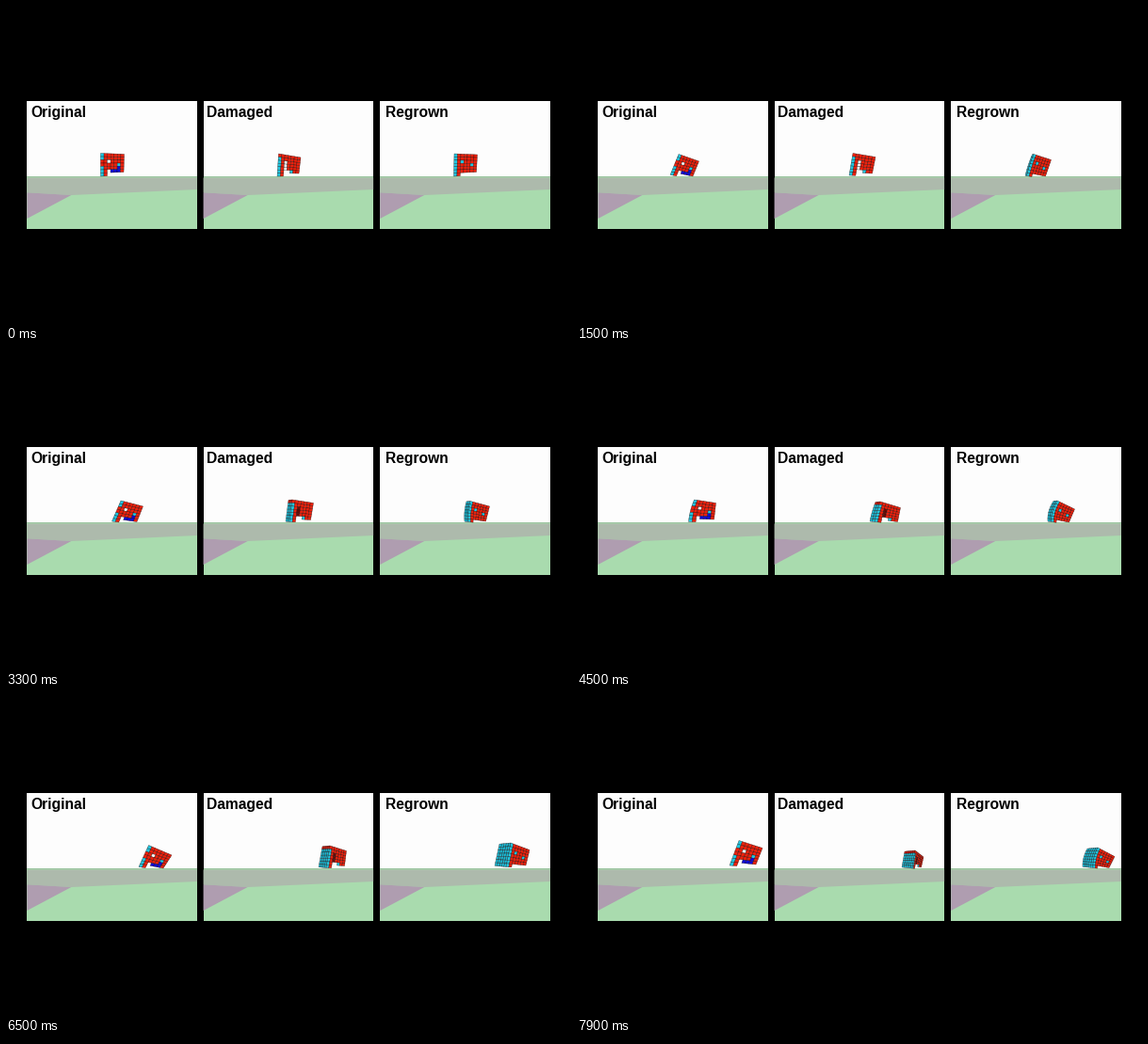
Animation, 600 px wide and 338 px high, one loop 8000 ms. Source, as a matplotlib script:

```python
import numpy as np
import matplotlib.pyplot as plt
from matplotlib.animation import FuncAnimation
from matplotlib.collections import PolyCollection
from matplotlib.patches import Polygon

W, H, DPI = 600, 338, 100
FRAMES, STEP = 80, 100
PX = 72 / DPI
GROUND = 181.2
N = 7

RED, CYAN, BLUE = (0.93, 0.13, 0.05), (0.13, 0.78, 0.88), (0.05, 0.04, 0.85)
SIDE_CYAN, SIDE_RED = (0.10, 0.73, 0.83), (0.78, 0.09, 0.04)
WHITE, INNER = np.array((0.99, 0.99, 0.99)), np.array((0.40, 0.05, 0.03))
PAINT = {"R": RED, "C": CYAN, "B": BLUE}

TIMES = [0, 1500, 3300, 4500, 5700, 6500, 7900]

# Voxel maps: R muscle, C rigid, B soft, H hole, . empty
ORIGINAL = ["CRRRRRR", "CRRRRRR", "RRHRRRR", "RRRRRCR",
            "CRRRRBR", "CR.BBBR", "CR....."]
DAMAGED = ["RRRRRRR", "CRRRRRR", "CRHRRRR", "CRHRRRR",
           "CRHRRRR", "CR..CRR", "CR....."]
REGROWN = ["CRRRRRR", "CRRRRRR", "CRCRRRR", "CRRRRCR",
           "CRRRRRR", "CRRRRRR", "CR....."]

# Each pose: top left, top right, lower right, foot, side depth, bow
ORIGINAL_POSES = [
    (100.5, 156.5, 125.5, 157.5, 125, 176.5, 100.5, 181, 0, 0),
    (108, 157.5, 129.5, 165, 123, 181, 99, 179.5, 0, 0),
    (122, 158, 145.5, 164, 139, 180.5, 112.5, 180, 0, 0),
    (124.5, 157, 147.5, 160.5, 145.5, 178, 118.5, 180.5, 0, 1),
    (138, 156, 162, 160, 156, 178, 131, 180.5, 0, 0),
    (151.5, 156.5, 176, 167, 167, 181, 141, 179.5, 0, 0),
    (172, 151.5, 197, 159.5, 190, 177, 162, 178, 0, 0),
]
DAMAGED_POSES = [
    (289.5, 157, 313, 161, 311, 178, 288, 181, 0, 0),
    (293, 156.5, 317, 160.5, 313.5, 178, 289, 180, 0, 0),
    (304, 157, 326.5, 160.5, 323.5, 178.5, 301, 180.5, 4, 0),
    (322, 159, 343.5, 165.5, 340.5, 180.5, 316, 180.5, 5, 0.5),
    (335, 156.5, 355, 162, 351, 177.5, 334.5, 179, 6.5, 0),
    (344, 157, 361.5, 162.5, 359.5, 178.5, 340, 180.5, 8, 0),
    (359, 162, 368, 169, 365.5, 180, 356, 181, 11, 0),
]
REGROWN_POSES = [
    (476, 157, 500.5, 158, 499.5, 176.5, 475.5, 181, 0, 0),
    (485, 157.5, 503.5, 163.5, 497.5, 181, 477.5, 180.5, 1.5, 0.5),
    (493, 158.5, 513.5, 164, 509.5, 180, 491, 180.5, 4, 1),
    (510, 158, 528.5, 167, 522.5, 181, 504, 180.5, 4, 2),
    (525, 159, 543.5, 169, 536.5, 181, 518.5, 180.5, 6, 2),
    (536, 154, 556, 161.5, 552, 178, 531, 179.5, 12, 0),
    (553, 159, 571, 168.5, 565, 180.5, 548, 180.5, 11, 1.5),
]


def pose_at(poses, t, swing):
    """Blend the key poses and rock the body about its feet in between."""
    poses = np.array(poses, float)
    p = np.array([np.interp(t, TIMES, col) for col in poses.T])
    quad, depth, bow = p[:8].reshape(4, 2), p[8], p[9]

    i = min(np.searchsorted(TIMES, t, side="right") - 1, len(TIMES) - 2)
    span = TIMES[i + 1] - TIMES[i]
    cycles = max(1, round(span / 450))
    phase = np.sin(np.pi * cycles * (t - TIMES[i]) / span)
    a = np.radians(swing) * phase
    pivot = (quad[2] + quad[3]) / 2
    turn = np.array([[np.cos(a), np.sin(a)], [-np.sin(a), np.cos(a)]])
    quad = (quad - pivot) @ turn + pivot
    quad[:, 1] -= max(0, quad[2:, 1].max() - GROUND)
    return quad, depth, bow


def robot(cells, quad, depth, bow):
    """Return voxel polygons and their colours, side face first."""
    tl, tr, low, bl = quad
    br = tr + (low - tr) * N / (N - 1)

    def front(c, r):
        u, v = c / N, r / N
        pt = (1 - v) * ((1 - u) * tl + u * tr) + v * ((1 - u) * bl + u * br)
        return pt - [bow * 4 * v * (1 - v) * (1 - u), 0]

    def side(k, r):
        return front(0, r) - [k * depth, k * depth * 0.1 * (2 * r / N - 1)]

    polys, colors = [], []

    def cell(at, c, r, dc, color):
        polys.append([at(c, r), at(c + dc, r), at(c + dc, r + 1), at(c, r + 1)])
        colors.append(color)

    if depth > 0.4:
        n = max(1, round(depth / 2.2))
        for r in range(N):
            color = SIDE_CYAN if cells[r][0] == "C" else SIDE_RED
            for k in range(n):
                cell(side, k / n, r, 1 / n, color)
    shade = min(1, depth / 4)
    for r, row in enumerate(cells):
        for c, kind in enumerate(row):
            if kind == "H":
                cell(front, c, r, 1, tuple(WHITE * (1 - shade) + INNER * shade))
            elif kind != ".":
                cell(front, c, r, 1, PAINT[kind])
    return polys, colors


fig = plt.figure(figsize=(W / DPI, H / DPI), dpi=DPI, facecolor="black")
ax = fig.add_axes([0, 0, 1, 1])
ax.set_xlim(0, W)
ax.set_ylim(H, 0)
ax.axis("off")


def fill(points, color, z):
    ax.add_patch(Polygon(points, closed=True, fc=color, ec="none", zorder=z))


def box(x0, y0, x1, y1, color, z):
    fill([(x0, y0), (x1, y0), (x1, y1), (x0, y1)], color, z)


def panel(x, label, text_x):
    right = x + 180.5
    box(x, 101, right, 237, "#fdfdfd", 1)
    box(x, 181, right, 237, "#a9dbae", 2)
    fill([(x, 182.5), (right, 182.5), (right, 195), (x + 47, 201), (x, 198.3)],
         "#adbaac", 3)
    fill([(x, 198.3), (x + 47, 201), (x, 226)], "#af9db0", 3)
    box(x, 180.7, right, 181.5, "#9cc5a1", 3)
    ax.text(text_x, 118, label, family="Liberation Sans", weight="bold",
            size=15.6 * PX, color="black", va="baseline", zorder=6)


panel(22.3, "Original", 26)
panel(209.6, "Damaged", 213.2)
panel(397.2, "Regrown", 402.8)

ROBOTS = [(ORIGINAL, ORIGINAL_POSES, 5), (DAMAGED, DAMAGED_POSES, 5),
          (REGROWN, REGROWN_POSES, 6)]
bodies = [PolyCollection([], edgecolors=(0.08, 0, 0, 0.75),
                         linewidths=0.4 * PX, zorder=5) for _ in ROBOTS]
for body in bodies:
    ax.add_collection(body, autolim=False)


def update(i):
    for body, (cells, poses, swing) in zip(bodies, ROBOTS):
        polys, colors = robot(cells, *pose_at(poses, i * STEP, swing))
        body.set_verts(polys)
        body.set_facecolor(colors)
    return bodies


anim = FuncAnimation(fig, update, frames=FRAMES, interval=STEP,
                     repeat=True, repeat_delay=0, blit=False)
plt.show()
```
